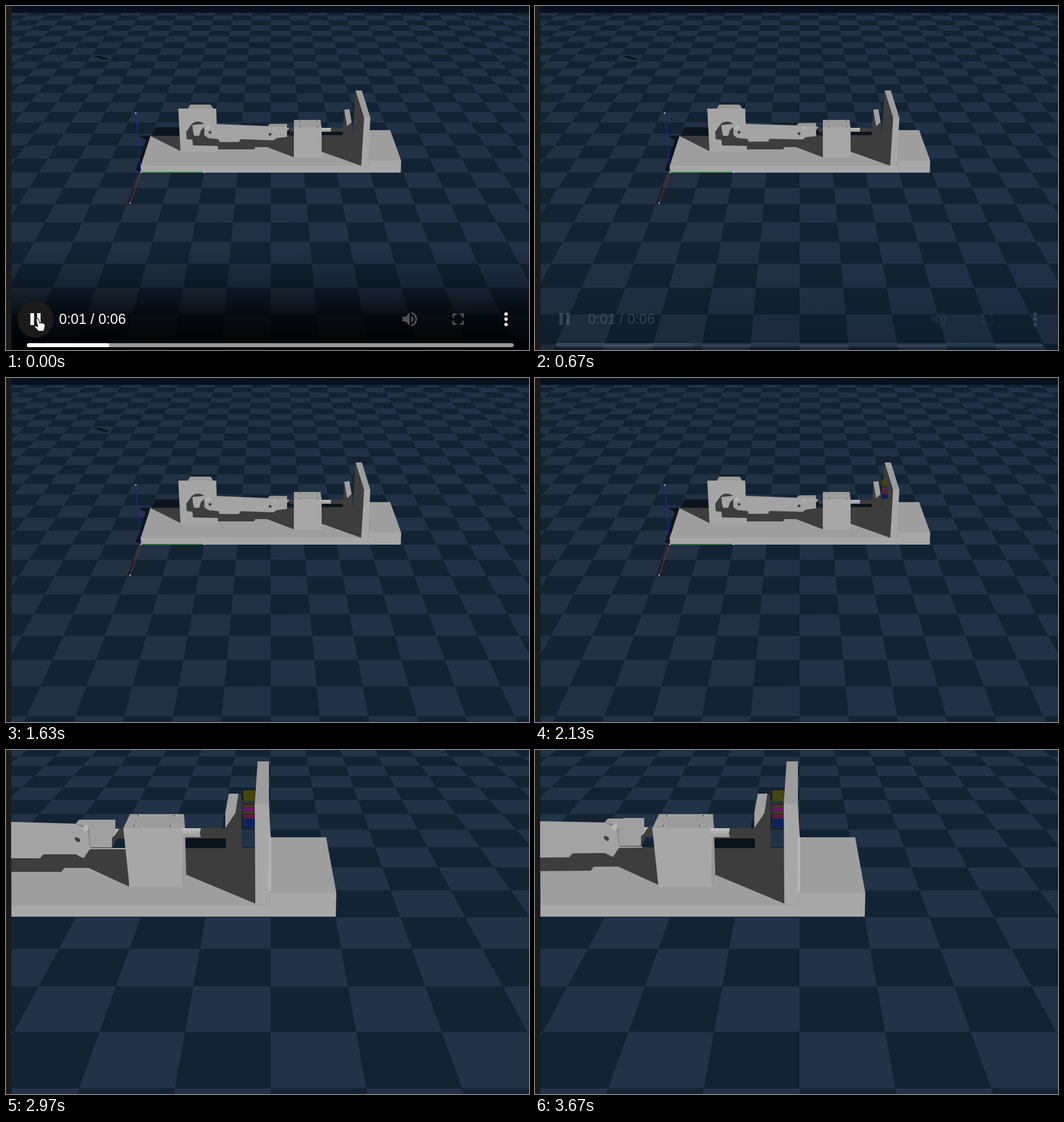
Animation, 923 px wide and 607 px high, one loop 3.71 s. Source, as an HTML page:

```html
<!DOCTYPE html>
<html lang="en">
<head>
<meta charset="utf-8">
<title>Simulation playback</title>
<style>
  html, body { margin: 0; width: 100%; height: 100%; overflow: hidden; background: #1b1b1b; }
  svg { display: block; width: 923px; height: 607px; }

  #near, #far, #ui, #pin, #drop, #spot, #hover, #hand, .arm, #done {
    animation: 3710ms linear infinite;
  }
  #far { animation-name: far; }
  #near { animation-name: near; }
  #pin { animation-name: pin; }
  #drop { animation-name: drop; }
  #spot { animation-name: pin; }
  #ui { animation-name: fade; }
  #hover { animation-name: hover; }
  #hand { animation-name: leave; }
  #done { animation-name: play; }
  #far .arm { animation-name: swayFar; transform-origin: 340px 220px; }
  #near .arm { animation-name: swayNear; transform-origin: -130px 150px; }

  /* 2270 ms: camera cut */
  @keyframes far { 0%, 61.18% { visibility: visible } 61.19%, 100% { visibility: hidden } }
  @keyframes near { 0%, 61.18% { visibility: hidden } 61.19%, 100% { visibility: visible } }
  @keyframes pin { 0%, 53.9% { opacity: 0 } 53.91%, 100% { opacity: 1 } }
  @keyframes drop { 0%, 53.9% { opacity: 1 } 53.91%, 100% { opacity: 0 } }
  @keyframes fade { 0%, 10.24% { opacity: 1 } 19.41%, 100% { opacity: 0 } }
  @keyframes hover { 0%, 5% { opacity: 1 } 7%, 100% { opacity: 0 } }
  @keyframes leave {
    0%, 4% { transform: none; opacity: 1 }
    9% { transform: translate(-70px, -6px); opacity: 1 }
    9.01%, 100% { transform: translate(-70px, -6px); opacity: 0 }
  }
  @keyframes play { 0% { width: 145px } 100% { width: 682px } }
  @keyframes swayFar {
    0%, 44% { transform: none; animation-timing-function: ease-in-out }
    20% { transform: rotate(-.6deg); animation-timing-function: ease-in-out }
    61% { transform: rotate(-.4deg) }
    100% { transform: none }
  }
  @keyframes swayNear {
    0%, 80% { transform: none; animation-timing-function: ease-in-out }
    99%, 100% { transform: rotate(-.5deg) }
  }
</style>
</head>
<body>
<svg viewBox="0 0 923 607" xmlns="http://www.w3.org/2000/svg">
  <defs>
    <linearGradient id="shade" x1="0" y1="0" x2="0" y2="1">
      <stop offset="0" stop-opacity="0"/>
      <stop offset=".37" stop-opacity=".3"/>
      <stop offset=".65" stop-opacity=".72"/>
      <stop offset="1" stop-opacity=".97"/>
    </linearGradient>
    <linearGradient id="rod" x1="0" y1="0" x2="0" y2="1">
      <stop offset="0" stop-color="#c2c2c2"/>
      <stop offset="1" stop-color="#979797"/>
    </linearGradient>
    <linearGradient id="light">
      <stop offset=".4" stop-color="#223243"/>
      <stop offset=".65" stop-color="#213148"/>
    </linearGradient>
    <clipPath id="view"><path d="M9.5 0H923V607H9.5z"/></clipPath>
    <clipPath id="ground"><path d="M9.5 12H923V607H9.5z"/></clipPath>
  </defs>
  <rect width="923" height="607" fill="#1b1b1b"/>

  <g clip-path="url(#view)">
    <g id="far">
      <path fill="#07101d" d="M9 0H923V12H9z"/>
      <g clip-path="url(#ground)">
        <path fill="#122333" d="M9 12H923V607H9z"/>
        <path id="tilesFar" fill="url(#light)"/>
      </g>
      <path id="drop" fill="#0a141e" d="M154 88L165 88 181 93 179 95 169 94z"/>
      <path id="spot" fill="#0a141e" d="M166 90H174V92H167z"/>

      <!-- floor shadow -->
      <path fill="#0b141e" d="M264 214H308V231H257L238 291 229 290 247 237 234 229H257zM495 215H600V229H495z"/>
      <!-- base -->
      <path fill="#9e9e9e" d="M255 229H641V283H237.500z"/>
      <path fill="#a8a8a8" d="M237.500 282H641V273H697.500L696.500 294H237.500z"/>
      <path fill="#9e9e9e" d="M641 219H678L697.500 273H638z"/>
      <!-- cast shadows -->
      <path fill="#3d3d3d" d="M254 229H308V256zM500 215H508V222H500zM557 215H596V222H557zM557 228H614L627 282 557 257z"/>
      <path fill="#a5a5a5" d="M304 181H371L373 246V257H308z"/>
      <path fill="#b0b0b0" d="M359 174L365 181H359z"/>
      <path fill="#999" d="M325 174H361L366 181H321z"/>
      <path fill="#3d3d3d" d="M318 222L328 208Q338 200 350 208L352 228H508V267L461 249H440L438 253H374V247L330 246 329 236 319 235z"/>
      <path fill="#122333" d="M500 223H508V229H500z"/>

      <g class="arm">
        <path fill="#a6a6a6" d="M329 210L350 208 352 212 344 219 341 229H332L330 221z"/>
        <path fill="#a3a3a3" d="M356 209L366 208 462 212 465 208H496V231L478 233 472 237 414 235 411 240H377L375 235 357 233 350 228V215z"/>
        <path fill="#b3b3b3" d="M350 216L357 209 362 214 355 219z"/>
        <path fill="#969696" d="M465 208H496L494 213H463z"/>
        <path fill="#b0b0b0" d="M471 216L475 213 478 217 474 220z"/>
        <path fill="#bbb" d="M496 215L500 215 497 221z"/>
        <g fill="#3d3d3d"><circle cx="360" cy="223" r="2.500"/><circle cx="466" cy="226.500" r="2.500"/></g>
      </g>

      <!-- guide block and rod -->
      <path fill="url(#rod)" d="M556 215H574L573 219 574 222H556z"/>
      <path fill="#9c9c9c" d="M508 201H555L557 214H508z"/>
      <path fill="#a7a7a7" d="M508 214H557V267H508z"/>
      <path stroke="#555" stroke-width="1.500" d="M517 203h2M548 203h2M518 213h2M549 213h2"/>
      <!-- plates -->
      <path fill="#3d3d3d" d="M597 184L606 182 610 205 612 228H594z"/>
      <path fill="#a0a0a0" d="M597 183L606 182 610 205 602 212z"/>
      <path fill="#3d3d3d" d="M617 149L633 197 627 282 612 229z"/>
      <g id="pin"><use href="#bands" transform="translate(401.500 144.500) scale(.503)"/></g>
      <path fill="#9c9c9c" d="M617 149H628L643 197H632z"/>
      <path fill="#a7a7a7" d="M632 197H643L639 274 637 282H627z"/>

      <!-- axes -->
      <g fill="none" stroke-width="1.400">
        <path stroke="#25269a" d="M238 293L229 189"/>
        <path stroke="#268a2b" d="M238 293.500H350"/>
        <path stroke="#86251f" d="M238 293L219 348"/>
      </g>
      <g fill="#ddd"><circle cx="229" cy="189" r="1.200"/><circle cx="350" cy="293.500" r="1.200"/><circle cx="219" cy="348" r="1.200"/><circle cx="238" cy="293.500" r="1.200"/></g>
    </g>

    <g id="near">
      <path fill="#122333" d="M9 0H923V607H9z"/>
      <path id="tilesNear" fill="#223247"/>
      <!-- base -->
      <path fill="#9e9e9e" d="M0 173H467V274H0z"/>
      <path fill="#a8a8a8" d="M0 274H466V251H583L582 294H0z"/>
      <path fill="#9e9e9e" d="M467 154H565L583 252H464z"/>
      <path fill="#0a131c" d="M316 155H389V173H316z"/>
      <path fill="#3d3d3d" d="M312 138H390V156H312zM316 173H440V271L318 220z"/>

      <g class="arm">
        <path fill="#3d3d3d" d="M-20 175H217V241L146 208H103L98 215H-20z"/>
        <path fill="#3d3d3d" d="M186 158L197 138H210V156H196L188 172z"/>
        <path fill="#a3a3a3" d="M-20 126L123 130 147 140 150 172 137 191 123 184H66L60 191H-20z"/>
        <path fill="#a0a0a0" d="M129 123H193V150L187 155V172H149L147 138 123 130z"/>
        <path fill="#8c8c8c" d="M147 140L150 174 148 176 144 142z"/>
        <path fill="#b6b6b6" d="M134 138L142 131 147 138 140 145zM193 139L200 139 193 149z"/>
        <path fill="#b0b0b0" d="M146 173H211V175H146z"/>
        <path fill="#3d3d3d" d="M121 155Q125 152 130 157 132 161 128 163 122 161 121 155z"/>
      </g>
      <path fill="#122333" d="M196 157H212V172H189z"/>

      <!-- guide block and rod -->
      <path fill="#9c9c9c" d="M219 113H314L316 138H207z"/>
      <path fill="#a7a7a7" d="M207 138L314 137 317 180 313 242H218z"/>
      <path fill="#999" d="M313 137L316 139 318 219 313 242 311 228z"/>
      <path stroke="#555" stroke-width="2" d="M232 116h3M296 116h3M225 133.500h3M289 133.500h3"/>
      <path stroke="#c4c4c4" stroke-width="2" d="M235 116h4M299 116h3M228 133.500h3M292 133.500h3"/>
      <path fill="url(#rod)" d="M310 138H344L342 147 344 154H311z"/>

      <!-- plates -->
      <path fill="#3d3d3d" d="M409 77L415 79 416 173H388V138L404 111z"/>
      <path fill="#a0a0a0" d="M393 77H410L405 111 387 138V112z"/>
      <g id="bands">
        <path fill="#292b2d" d="M419 71H440V137H419z"/>
        <path fill="#45450f" d="M419 71H440V90H419z"/>
        <path fill="#0e4a42" d="M419 91H440V93H419z"/>
        <path fill="#5c1630" d="M419 95H440V97H419z"/>
        <path fill="#45450f" d="M419 98H440V101H419zM419 109H440V112H419z"/>
        <path fill="#6d1272" d="M419 102H440V108H419z"/>
        <path fill="#6b143f" d="M419 114H440V120H419z"/>
        <path fill="#0b2162" d="M421 121H440V136H421z"/>
      </g>
      <path fill="#9c9c9c" d="M444 20H464V96H439z"/>
      <path fill="#a7a7a7" d="M439 95H464L467 150 466 252 464 274 440 271z"/>
      <path fill="#b5b5b5" d="M464 150L468 154V248L463 251z"/>
    </g>
  </g>

  <!-- player controls -->
  <g id="ui">
    <path fill="url(#shade)" d="M9.500 435H923V607H9.500z"/>
    <circle id="hover" cx="52" cy="553" r="32" fill="#1b1b1b"/>
    <g fill="#fff">
      <path d="M43 542H49.500V563H43zM55 542H61V563H55z"/>
      <circle cx="882.500" cy="543.500" r="3"/><circle cx="882.500" cy="552.500" r="3"/><circle cx="882.500" cy="562" r="3"/>
      <text x="93.500" y="561" font-size="25" font-family="'Liberation Sans', Arial, sans-serif">0:01 / 0:06</text>
      <g opacity=".3">
        <path transform="translate(695.300 535.400) scale(1.430)" d="M3 9v6h4l5 5V4L7 9zM14 8q2.500 1.200 2.500 4T14 16zM14 3.200v2.100a7 7 0 0 1 0 13.400v2.100a9 9 0 0 0 0-17.600z"/>
        <path transform="translate(780.800 535.400) scale(1.430)" d="M5 5h5v2H7v3H5zM14 5h5v5h-2V7h-3zM5 14h2v3h3v2H5zM17 14h2v5h-5v-2h3z"/>
      </g>
    </g>
    <rect x="37" y="595" width="859" height="7" rx="3.500" fill="#9c9c9c"/>
    <rect id="done" x="37" y="595" width="145" height="7" rx="3.500" fill="#fff"/>
  </g>
  <path id="hand" fill="#fff" stroke="#111" stroke-width="1.300" stroke-linejoin="round"
    d="M53 553Q55 550 57 553L60 560Q62 557 64 560 66 558 67 561 69 560 69 564L68 570 66 574H57L50 566Q50 563 54 565L56 566z"/>
</svg>
<script>
  // Light squares of a checkered floor in one-point perspective.
  function tiles(id, horizon, depth, start, gap, rows, cols, odd) {
    const rowY = n => horizon + depth / (start + n);
    const at = (c, y) => (467 + c * gap * (y - horizon)).toFixed(1) + ' ' + y.toFixed(1);
    let d = '';
    for (let n = -1; n < rows; n++) {
      const low = rowY(n), high = rowY(n + 1);
      for (let c = -cols; c < cols; c++) {
        if (Math.abs(n + c) % 2 !== odd) continue;
        d += `M${at(c, low)}L${at(c + 1, low)} ${at(c + 1, high)} ${at(c, high)}z`;
      }
    }
    document.getElementById(id).setAttribute('d', d);
  }
  tiles('tilesFar', -346, 15936, 16.9, .0913, 28, 16, 1);
  tiles('tilesNear', -340, 7881, 8.41, .1803, 16, 10, 0);
</script>
</body>
</html>
```
